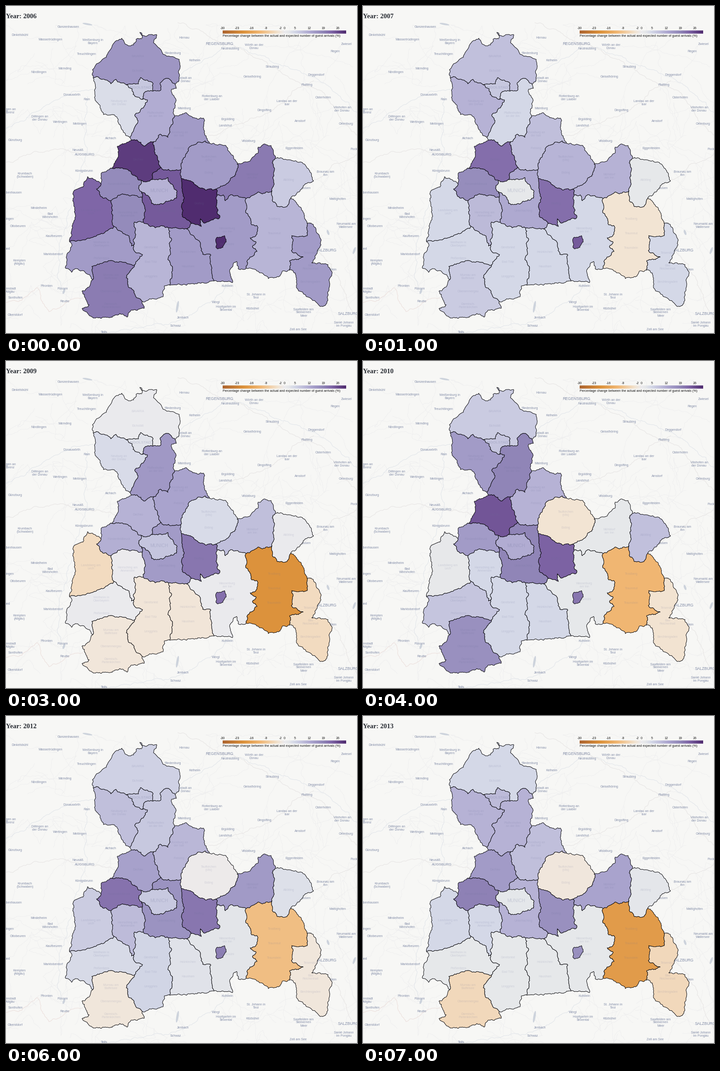
Recreate the animation shown at these times as a matplotlib script. Size 776 by 722 pixels, loop 8000 ms.

```python
import numpy as np
import matplotlib.pyplot as plt
from matplotlib.animation import FuncAnimation
from matplotlib.colors import LinearSegmentedColormap
from matplotlib.patches import Polygon, Ellipse

W, H, DPI = 776, 722, 100
PX = 72 / DPI
LOW, HIGH = -30, 30
rng = np.random.default_rng(4)

fig = plt.figure(figsize=(W / DPI, H / DPI), dpi=DPI, facecolor="#f7f7f5")
ax = fig.add_axes([0, 0, 1, 1])

SCALE = {-30: "#ad6530", -20: "#dc923c", -12: "#f0b672", -3: "#f2e4d3",
         0: "#ecebee", 2: "#e6e8ea", 5: "#d4d8e7", 13: "#aca6cf",
         19: "#9086b7", 23: "#8067a8", 30: "#502c6f"}


def part(value):
    return (value - LOW) / (HIGH - LOW)


ramp = LinearSegmentedColormap.from_list(
    "ramp", [(part(v), c) for v, c in SCALE.items()], N=600)


def arc(*xy, rough=0.24, limit=2.2):
    """Line through key points, roughened by midpoint displacement."""
    p = np.reshape(xy, (-1, 2)).astype(float)
    while True:
        d = np.diff(p, axis=0)
        size = np.hypot(*d.T)[:, None]
        if size.mean() < 3:
            return p
        shift = rng.uniform(-1, 1, size.shape) * np.minimum(rough * size, limit)
        out = np.empty((2 * len(p) - 1, 2))
        out[::2] = p
        out[1::2] = p[:-1] + d / 2 + d[:, ::-1] * [-1, 1] / size * shift
        p = out


def ring(first, *rest):
    """Chain arcs end to end, flipping those that run backwards."""
    p = first
    for a in rest:
        if np.hypot(*(a[-1] - p[-1])) < np.hypot(*(a[0] - p[-1])):
            a = a[::-1]
        p = np.vstack([p, a])
    return p


def centroid(p):
    x, y = p.T
    u, v = np.roll(x, -1), np.roll(y, -1)
    cross = x * v - u * y
    return ((x + u) @ cross / cross.sum() / 3, (y + v) @ cross / cross.sum() / 3)


def label(x, y, text, size=7, color="#838da8", **kw):
    ax.text(x, y, text, fontsize=size * PX, color=color, family="Liberation Sans",
            **{"ha": "center", "va": "center", "linespacing": 1.0, **kw})


def way(color, width, *xy):
    p = arc(*xy, rough=0.15, limit=5)
    ax.plot(*p.T, color=color, lw=width * PX, zorder=1)


# Base map: wandering minor roads, small lakes, rivers and motorways
for _ in range(190):
    x, y = rng.uniform(0, W), rng.uniform(45, H)
    steps = rng.normal(0, 45, (3, 2)).cumsum(axis=0) + (x, y)
    way("#ededee", 0.7, x, y, *np.clip(steps, (0, 42), (W, H)).ravel())

for x, y, w, h, angle in [(180, 40, 22, 4, 10), (379, 664, 5, 26, 10),
                          (128, 630, 5, 12, 20), (712, 500, 5, 12, -20),
                          (770, 540, 5, 16, 20)]:
    ax.add_patch(Ellipse((x, y), w, h, angle=angle, color="#cdd3dc", lw=0))

RIVER, ROAD, BORDER = "#e1e5ea", "#e9e7e6", "#ecdedb"
way(RIVER, 1, 0, 270, 145, 190, 380, 160, 480, 88, 590, 125, 690, 162, 776, 235)
way(RIVER, 1, 180, 200, 178, 330, 118, 530, 122, 630)
way(RIVER, 1, 210, 718, 380, 695, 460, 650, 492, 610)
way(ROAD, 1.2, 0, 345, 100, 318, 245, 340)
way(ROAD, 1.2, 380, 37, 520, 95, 700, 190, 776, 285)
way(ROAD, 1.2, 448, 285, 570, 240, 680, 165)
way(ROAD, 1.2, 655, 405, 720, 352, 776, 325)
way(ROAD, 1.2, 680, 540, 720, 570, 776, 690)
way(BORDER, 1, 0, 655, 35, 650, 70, 622, 95, 675, 170, 645)

label(472, 83, "REGENSBURG", 8.7)
label(174, 328, "AUGSBURG", 7.8)
label(708, 540, "SALZBURG", 8.6)
label(757, 680, "SALZBURG", 8.6)
for x, y, name in [
        (138, 47, "Gunzenhausen"), (31, 64, "Dinkelsbühl"), (99, 75, "Wassertrüdingen"),
        (192, 79, "Weißenburg in\nBayern"), (178, 107, "Treuchtlingen"),
        (131, 138, "Wemding"), (73, 146, "Nördlingen"), (145, 197, "Donauwörth"),
        (179, 207, "Rain"), (75, 248, "Dillingen an\nder Donau"), (120, 256, "Wertingen"),
        (163, 261, "Meitingen"), (3, 232, "Giengen an\nder Brenz"), (20, 296, "Günzburg"),
        (159, 318, "Neusäß"), (232, 293, "Aichach"), (172, 365, "Königsbrunn"),
        (42, 374, "Krumbach\n(Schwaben)"), (13, 412, "Babenhausen"),
        (73, 447, "Mindelheim"), (98, 463, "Bad\nWörishofen"), (26, 486, "Ottobeuren"),
        (-2, 470, "Memmingen"), (106, 509, "Kaufbeuren"), (-4, 537, "Altusried"),
        (104, 548, "Marktoberdorf"), (30, 566, "Kempten\n(Allgäu)"), (90, 619, "Pfronten"),
        (125, 624, "Füssen"), (4, 628, "Immenstadt\nim Allgäu"), (21, 644, "Sonthofen"),
        (130, 653, "Reutte"), (20, 682, "Oberstdorf"), (394, 70, "Hernau"),
        (496, 95, "Neutraubling"), (548, 90, "Wörth an der\nDonau"),
        (369, 105, "Riedenburg"), (417, 121, "Kelheim"), (728, 101, "Regen"),
        (753, 85, "Zwiesel"), (589, 134, "Straubing"), (545, 156, "Geiselhöring"),
        (686, 153, "Deggendorf"), (665, 174, "Plattling"), (391, 163, "Neustadt an\nder Donau"),
        (701, 202, "Osterhofen"), (455, 203, "Rottenburg an\nder Laaber"),
        (621, 214, "Landau an der\nIsar"), (571, 230, "Dingolfing"),
        (743, 228, "Vilshofen an\nder Donau"), (394, 226, "Mainburg"),
        (490, 250, "Ergolding"), (485, 265, "Landshut"), (650, 254, "Arnstorf"),
        (752, 261, "Ortenburg"), (536, 298, "Vilsbiburg"), (637, 315, "Eggenfelden"),
        (774, 316, "Pocking"), (706, 370, "Braunau am\nInn"), (655, 402, "Burghausen"),
        (733, 427, "Mattighofen"), (752, 485, "Neumarkt am\nWallersee"),
        (720, 582, "Hallein"), (658, 677, "Saalfelden am\nSteinernen\nMeer"),
        (747, 703, "Sankt Johann\nim Pongau"), (646, 714, "Zell am See"),
        (553, 641, "St. Johann in\nTirol"), (545, 669, "Kitzbühel"), (489, 619, "Kufstein"),
        (464, 654, "Wörgl"), (486, 668, "Hopfgarten im\nBrixental"),
        (391, 689, "Jenbach"), (375, 706, "Schwaz"), (217, 721, "Telfs")]:
    label(x, y, name)

# Outer edges, clockwise from the north-west
out_eich = arc(193, 159, 191, 141, 222, 113, 227, 101, 245, 76, 256, 71, 271, 88,
               282, 86, 288, 73, 300, 72, 296, 58, 306, 66, 333, 63, 326, 81, 352, 108,
               383, 118, 383, 141, 380, 168, 374, 173)
out_pfaf = arc(374, 173, 377, 181, 366, 184, 375, 212, 370, 228, 373, 243)
out_frei = arc(373, 243, 396, 236, 425, 250, 437, 248, 437, 270, 450, 303)
out_erd = arc(450, 303, 486, 308, 498, 328, 511, 349)
out_mueh = arc(511, 349, 540, 342, 557, 325, 557, 312, 568, 306, 586, 308, 596, 336)
out_alt = arc(596, 336, 630, 340, 660, 349, 680, 386, 660, 395, 642, 415, 630, 424)
out_trau = arc(630, 424, 658, 457, 666, 480)
out_bgl = arc(666, 480, 674, 479, 697, 517, 688, 545, 676, 567, 712, 571, 721, 590,
              711, 632, 708, 658, 699, 663, 645, 625, 640, 590, 627, 583)
south_trau = arc(627, 583, 610, 587, 603, 598, 580, 602, 558, 586, 531, 579)
out_ros = arc(531, 579, 514, 581, 510, 564, 495, 582, 500, 611, 460, 607)
out_mies = arc(460, 607, 412, 613, 362, 616)
out_toel = arc(362, 616, 350, 618, 347, 642, 301, 652)
out_garm = arc(301, 652, 306, 667, 275, 674, 268, 687, 252, 679, 228, 688, 193, 689,
               168, 668, 184, 660, 168, 630, 184, 620, 192, 604)
out_weil = arc(192, 604, 180, 592, 155, 580, 145, 588, 131, 578, 134, 552, 146, 528, 140, 519)
out_land = arc(140, 519, 147, 490, 153, 460, 148, 425, 149, 410, 170, 400, 180, 377,
               195, 383, 210, 394)
out_ffb = arc(210, 394, 213, 367, 229, 361)
out_dach = arc(229, 361, 246, 337, 246, 310, 277, 296)
west_pfaf = arc(277, 296, 274, 290)
out_neub = arc(274, 290, 265, 286, 254, 266, 239, 240, 216, 240, 197, 208, 193, 159)

# Shared borders
neub_eich = arc(193, 159, 205, 158, 232, 172, 243, 162, 266, 174)
ing_eich = arc(266, 174, 293, 172, 298, 158, 325, 171, 325, 188)
eich_pfaf = arc(325, 188, 342, 186, 341, 170, 356, 160, 374, 173)
neub_ing = arc(266, 174, 279, 183, 281, 195, 302, 206)
ing_pfaf = arc(302, 206, 308, 189, 325, 188)
neub_pfaf = arc(302, 206, 313, 208, 308, 218, 285, 240, 292, 253, 274, 290)
pfaf_dach = arc(277, 296, 290, 296, 304, 309, 326, 300)
pfaf_frei = arc(326, 300, 341, 283, 358, 290, 373, 243)
dach_frei = arc(326, 300, 328, 322, 342, 356)
frei_erd = arc(450, 303, 440, 298, 405, 312, 390, 345, 386, 362)
frei_mland = arc(342, 356, 350, 362, 386, 362)
dach_mland = arc(342, 356, 324, 370, 322, 383)
dach_mun = arc(322, 383, 310, 388, 299, 385)
dach_ffb = arc(229, 361, 243, 357, 270, 362, 299, 385)
ffb_mun = arc(299, 385, 293, 402, 300, 410)
ffb_mland = arc(300, 410, 301, 422)
ffb_star = arc(301, 422, 262, 416, 232, 430)
mun_mland = arc(300, 410, 318, 423, 322, 436, 345, 437, 377, 424, 378, 410, 360, 388,
                358, 379, 322, 383)
erd_mland = arc(386, 362, 388, 381)
erd_eber = arc(388, 381, 413, 389, 432, 402, 464, 404)
erd_mueh = arc(511, 349, 508, 372, 485, 395, 464, 404)
mueh_eber = arc(464, 404, 467, 417)
mueh_ros = arc(467, 417, 480, 417, 485, 430, 500, 417, 531, 425)
mueh_trau = arc(531, 425, 557, 411, 567, 415, 588, 408)
mueh_alt = arc(596, 336, 589, 347, 592, 385, 588, 408)
trau_alt = arc(588, 408, 590, 432, 600, 443, 621, 443, 630, 424)
eber_mland = arc(388, 381, 392, 428, 390, 465, 410, 480)
eber_ros = arc(467, 417, 467, 457, 472, 468, 440, 479, 430, 470, 432, 487, 410, 480)
mland_ros = arc(410, 480, 399, 492)
mland_mies = arc(399, 492, 360, 490)
mland_toel = arc(360, 490, 345, 485, 330, 490, 303, 477)
mland_star = arc(301, 422, 306, 456, 303, 477)
star_toel = arc(303, 477, 284, 477, 284, 526)
star_weil = arc(284, 526, 278, 530, 272, 508, 239, 487)
star_land = arc(232, 430, 239, 487)
land_ffb = arc(210, 394, 200, 404, 214, 424, 232, 430)
land_weil = arc(140, 519, 183, 513, 220, 498, 239, 487)
weil_toel = arc(284, 526, 282, 538, 302, 549, 284, 572)
weil_garm = arc(192, 604, 190, 575, 232, 562, 284, 572)
garm_toel = arc(284, 572, 266, 600, 270, 618, 301, 652)
toel_mies = arc(360, 490, 364, 520, 358, 560, 368, 585, 362, 616)
mies_ros = arc(399, 492, 430, 523, 435, 548, 453, 550, 460, 607)
ros_trau = arc(531, 425, 530, 456, 541, 470, 543, 483, 556, 487, 552, 508, 540, 512,
               552, 520, 545, 532, 555, 542, 535, 560, 531, 579)
trau_bgl = arc(666, 480, 666, 507, 632, 507, 631, 540, 657, 554, 627, 563, 627, 583)
city_ros = arc(464, 533, 466, 511, 483, 507, 487, 521, 475, 535, 464, 533)

KNOWN = (2006, 2007, 2009, 2010, 2011, 2013)
regions = []


def region(names, values, *arcs, size=6.8, alpha=0.2):
    """Fill bounded by arcs, its place names spread down its middle."""
    shape = ring(*arcs)
    patch = Polygon(shape, closed=True, ec="#08080c", lw=PX, joinstyle="round", zorder=3)
    ax.add_patch(patch)
    regions.append((patch, values))
    x, y = centroid(shape)
    for k, name in enumerate(names):
        label(x, y + 32 * (k - (len(names) - 1) / 2), name, size, "#6b7098",
              alpha=alpha, zorder=5)


region(["BAVARIA", "Eichstätt"], (16, 8.7, .5, 7, 7, 5),
       out_eich, eich_pfaf, ing_eich, neub_eich)
region(["Neuburg an\nder Donau"], (4, 11, 4.3, 15, 7, 11),
       neub_eich, neub_ing, neub_pfaf, out_neub)
region(["INGOLSTADT"], (7.5, 7.5, 3, 8, 6, 9.5), ing_eich, ing_pfaf, neub_ing,
       size=8.5, alpha=.3)
region(["Pfaffenhofen\nan der Ilm"], (12, 5, 15.5, 19, 4, 11), eich_pfaf, out_pfaf,
       pfaf_frei, pfaf_dach, west_pfaf, neub_pfaf, ing_pfaf)
region(["Moosburg an\nder Isar", "Freising"], (15, 9, 13.5, 11, 11.5, 9),
       out_frei, frei_erd, frei_mland, dach_frei, pfaf_frei)
region(["Dachau"], (28, 22, 11, 25, 13, 15),
       out_dach, pfaf_dach, dach_frei, dach_mland, dach_mun, dach_ffb)
region(["Taufkirchen\n(Vils)", "Erding"], (15, 10.7, 4.3, -3, 1, -2),
       out_erd, erd_mueh, erd_eber, erd_mland, frei_erd)
region(["Mühldorf\nam Inn"], (20.5, 11, 9, 2, 17, 13.5),
       out_mueh, mueh_alt, mueh_trau, mueh_ros, mueh_eber, erd_mueh)
region(["Altötting"], (7, 2, .5, 8.7, 4.5, 2.3), out_alt, trau_alt, mueh_alt)
region(["Fürstenfeldbruck"], (18, 17.7, 11.5, 15, 23.5, 19.5),
       out_ffb, dach_ffb, ffb_mun, ffb_mland, ffb_star, land_ffb)
region(["\n\n\n\nUnterhaching"], (24.5, 12.5, 15, 19, 22, 11), frei_mland, erd_mland,
       eber_mland, mland_ros, mland_mies, mland_toel, mland_star, ffb_mland,
       mun_mland, dach_mland)
region(["MUNICH"], (11, 2, 8, 12, 12.5, 2.2), ffb_mun, mun_mland, dach_mun,
       size=10, alpha=.25)
region(["Grafing"], (30, 22, 21, 23.5, 25, 17), erd_eber, mueh_eber, eber_ros, eber_mland)
region(["Landsberg am\nLech"], (23, 5, -4.8, 1.7, 8.6, 5),
       out_land, land_ffb, star_land, land_weil)
region(["Herrsching am\nAmmersee"], (18, 9.8, .3, 5, 14, 5),
       ffb_star[::-1], mland_star, star_toel, star_weil, star_land)
region(["Weilheim in\nOberbayern", "Peißenberg"], (15, 5, .5, 8, 7, 2),
       out_weil, land_weil, star_weil, weil_toel, weil_garm)
region(["Murnau am\nStaffelsee", "Oberammergau", "Garmisch-\nPartenkirchen"],
       (20.3, 7, -2.3, 17, 1, -5.3), out_garm, weil_garm, garm_toel)
region(["Geretsried", "Bad Tölz", "Lenggries"], (10.5, 5, -2.5, 5, 9, 2),
       out_toel, garm_toel, weil_toel, star_toel, mland_toel, toel_mies)
region(["Holzkirchen", "Hausham"], (15, 5, -2.5, 5, 4, 2),
       out_mies, toel_mies, mland_mies, mies_ros)
region(["Wasserburg\nam Inn", "Bruckmühl"], (15, 5, .5, 2, 3, 2),
       out_ros, mies_ros, mland_ros, eber_ros, mueh_ros, ros_trau)
region([], (30, 24.5, 21.7, 21, 22.8, 17), city_ros)
region(["Trostberg", "Traunreut", "Traunstein"], (10.5, -3, -20, -12, -3, -18),
       out_trau, trau_bgl, south_trau, ros_trau, mueh_trau, trau_alt)
region(["Teisendorf", "Bad\nReichenhall", "Berchtesgaden"],
       (15, 5, -4.8, -3.2, 1, -5.3), out_bgl, trau_bgl)

# Legend
X0, X1 = 479, 752
ax.imshow(np.linspace(0, 1, X1 - X0)[None], cmap=ramp, extent=(X0, X1, 61, 54),
          aspect="auto", interpolation="nearest", zorder=6)
for v in [*range(-30, 0, 7), 0, *range(5, 30, 7)]:
    label(X0 + part(v) * (X1 - X0), 49.5, str(v), 7.2, "#111111", zorder=6)
label(X0, 67, "Percentage change between the actual and expected number of"
      " guest arrivals (%)", 7.2, "#111111", ha="left", zorder=6)

title = ax.text(0, 27, "", fontsize=14.7 * PX, family="Liberation Serif",
                weight="bold", color="#2a2e35", va="baseline")
ax.set(xlim=(0, W), ylim=(H, 0))
ax.axis("off")


def update(i):
    year = KNOWN[0] + i
    title.set_text(f"Year: {year}")
    for patch, values in regions:
        patch.set_facecolor(ramp(part(np.interp(year, KNOWN, values))))
    return [title] + [patch for patch, _ in regions]


anim = FuncAnimation(fig, update, frames=8, interval=1000, repeat=True,
                     repeat_delay=0, blit=False)
plt.show()
```
